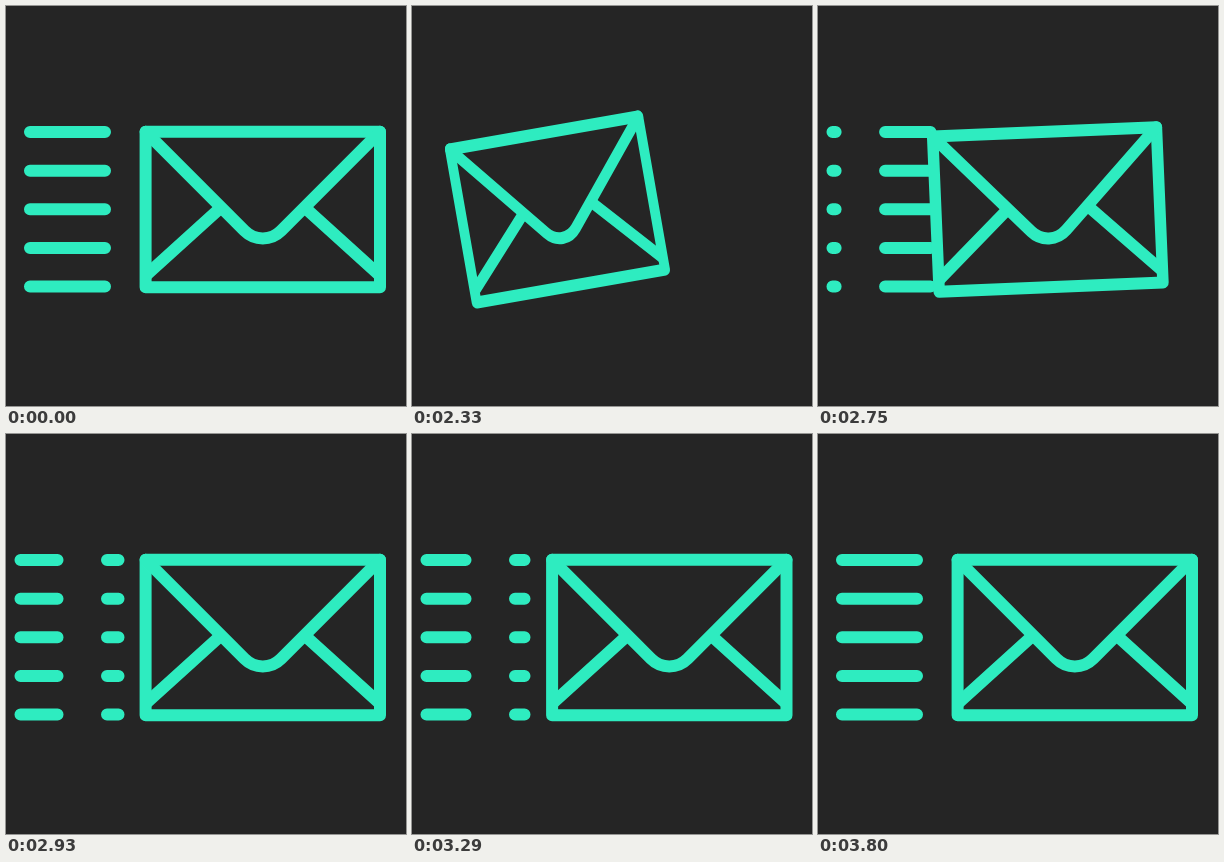
An HTML page that plays this animation: 400x400 px, repeating every 3830 ms.

```html
<!DOCTYPE html>
<html lang="en">
<head>
<meta charset="utf-8">
<title>Sending mail</title>
<style>
  html, body { margin: 0; width: 100%; height: 100%; overflow: hidden; background: #252525; }
  svg { display: block; width: 100vw; height: 100vh; }
  path { fill: none; stroke: #2eecc0; stroke-width: 12; stroke-linecap: round; stroke-linejoin: round; }
</style>
</head>
<body>
<svg viewBox="0 0 400 400">
  <path id="bars"/>
  <!-- drawn around its own centre -->
  <g id="mail">
    <path d="M-117.2 -77.7H117.2V77.7H-117.2Z"/>
    <path d="M-117.2 -77.7L-18.3 21.3A25.8 25.8 0 0 0 18.3 21.3L117.2 -77.7"/>
    <path style="stroke-linecap:butt" d="M-43 -1L-117 66M43 -1L117 66"/>
  </g>
</svg>
<script>
const LOOP = 3830, HOLD = 2030, TICK = 30, LAST = 59;
const ROWS = [126, 164.7, 203.2, 242, 280.5];
const PULL = 15, PUSH = 15;   // ticks for each half of the move
const bars = document.getElementById('bars');
const mail = document.getElementById('mail');

const clamp = v => Math.min(1, Math.max(0, v));
const expoOut = t => t >= 1 ? 1 : 1 - 2 ** (-10 * t);
const sineInOut = t => (1 - Math.cos(Math.PI * t)) / 2;
const cubicOut = t => 1 - (1 - t) ** 3;

// How far the envelope is pulled back: 0 at rest, 1 at the far left.
function pullAt(u) {
  return u < PULL ? expoOut(clamp(u / PULL))
                  : 1 - sineInOut(clamp((u - PULL) / PUSH));
}

// Spans of the speed lines as [from, to].
function spansAt(u, pull) {
  if (u < PULL) return [[24, 99 - 85 * pull]];
  if (u < 21) return [];
  const shift = -165 * (1 - cubicOut(clamp((u - 21) / 10))) + driftAt(u) * 2;
  return [[-80, 51.5], [101, 176]].map(([a, b]) =>
    [Math.max(14.5, a + shift), Math.min(112.5, b + shift)]);
}

// Slow settling after the envelope has shot back.
function driftAt(u) {
  return Math.max(0, u - 31) / 12;
}

function draw(time) {
  const t = time % LOOP;
  const tick = Math.floor((t - HOLD) / TICK);
  const u = tick < 0 || tick >= LAST ? 0 : tick + 1.1;
  const pull = pullAt(u);
  const x = 256.8 - 112 * pull + Math.min(0.6, driftAt(u) * 0.5);
  mail.setAttribute('transform',
    `translate(${x} 203.5) rotate(${-10 * pull}) scale(${1 - 0.185 * pull} 1)`);

  const spans = spansAt(u, pull).filter(([a, b]) => b > a);
  bars.setAttribute('d', ROWS.map(y =>
    spans.map(([a, b]) => `M${a} ${y}H${b}`).join('')).join(''));
}

const start = performance.now();
function loop() {
  draw(performance.now() - start);
  requestAnimationFrame(loop);
}
loop();
</script>
</body>
</html>
```
